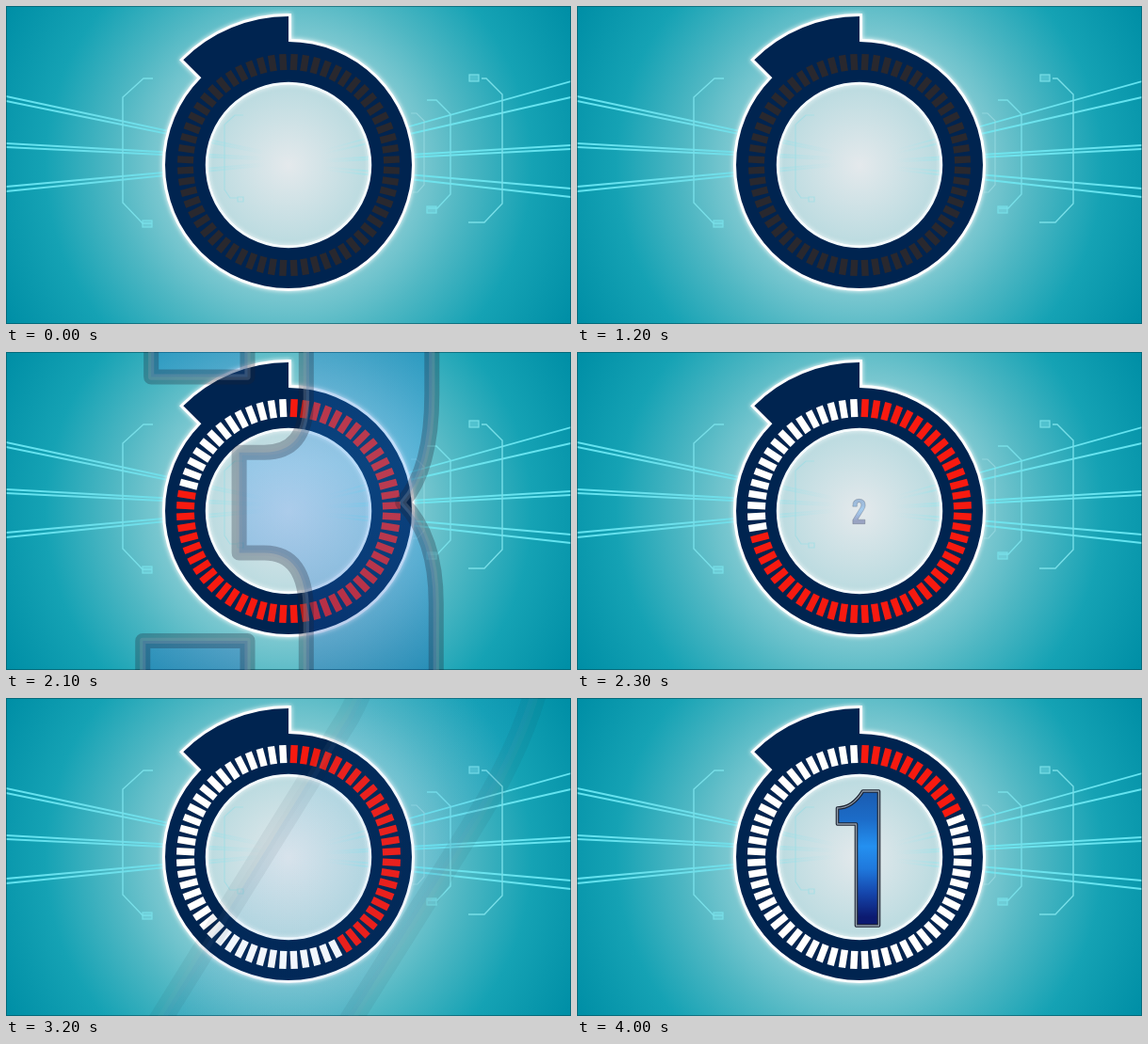
Write an HTML page with a canvas that moves like this. It is 600 px wide and 338 px high and loops after 4.1 s.

```html
<!DOCTYPE html>
<html lang="en">
<head>
<meta charset="utf-8">
<title>Countdown</title>
<style>
  html, body { margin: 0; width: 100%; height: 100%; overflow: hidden; background: #0096aa; }
  canvas { display: block; }
</style>
</head>
<body>
<canvas id="stage" width="600" height="338"></canvas>
<script>
const ctx = document.getElementById('stage').getContext('2d');
const W = 600, H = 338, CX = 300, CY = 169;
const LOOP = 4100, STEP = 100, TICKS = 60;
const NAVY = '#002450', TAU = Math.PI * 2;

// Digit outlines, relative to the dial centre
const digits = [
  'M-35-32V-46Q-35-72-1-72Q32-72 32-47V-28Q32-10 25-2Q33 6 33 22V46Q33 72-3 72Q-37 72-37 46V31H-12V47Q-12 54-5 54Q2 54 2 46V24Q2 10-8 10H-14V-14H-8Q2-14 2-26V-48Q2-58-5-58Q-12-58-12-48V-32Z',
  'M-43-29V-34Q-43-76-3-76Q37-76 37-36Q37-23 25-4L-12 55H35V82H-43V57L6-22Q11-31 11-42Q11-56-3-56Q-16-56-16-42V-29Z',
  'M20-70V73H-4V-35H-24V-52Q-8-52 3-70Z'
].map(d => new Path2D(d));

const brackets = new Path2D(
  'M156 77H146L124 97V209L145 231H155M505 77H510L527 94V210L508 230H491' +
  'M447 100H457L472 115V200L458 215H448');
const innerBrackets = new Path2D(
  'M430 114H436L444 122V190L437 198H432M252 116H243L232 126V195L238 204H246m0-1h6v5h-6z');
const beamEnds = { left: [96, 101, 146, 150, 192, 197], right: [80, 97, 148, 152, 194, 203] };

const clamp = x => Math.max(0, Math.min(1, x));

function gradient(g, stops) {
  stops.forEach(([at, color]) => g.addColorStop(at, color));
  return g;
}

const backdrop = gradient(ctx.createRadialGradient(CX, CY, 0, CX, CY, 340), [
  [0, '#e4e9ec'], [.25, '#bbdbe0'], [.38, '#82cad2'], [.55, '#4fb7c3'], [.76, '#15a2b4'], [1, '#008fa6']]);
const beamPaint = gradient(ctx.createLinearGradient(0, 0, W, 0), [
  [0, '#62e3f0'], [.28, '#72dde8'], [.38, '#a5dfe688'], [.46, '#c0e4ea00'],
  [.56, '#c0e4ea00'], [.7, '#72e3ec'], [1, '#62e3f0']]);
const digitPaint = gradient(ctx.createLinearGradient(0, -80, 0, 80), [
  [0, '#1a56a8'], [.25, '#1c6cc8'], [.43, '#2490f0'], [.58, '#1f78dc'], [.74, '#1546ac'], [.9, '#0c1a70']]);

function line(x1, y1, x2, y2) {
  ctx.beginPath();
  ctx.moveTo(x1, y1);
  ctx.lineTo(x2, y2);
  ctx.stroke();
}

function strokePath(path, color, width) {
  ctx.strokeStyle = color;
  ctx.lineWidth = width;
  ctx.stroke(path);
}

function drawBackground() {
  ctx.fillStyle = backdrop;
  ctx.fillRect(0, 0, W, H);

  ctx.strokeStyle = beamPaint;
  ctx.lineWidth = 1.8;
  beamEnds.left.forEach((y, i) => line(0, y, 290, 163 + (i - 2.5) * 2));
  beamEnds.right.forEach((y, i) => line(W, y, 310, 166 + (i - 2.5) * 2));

  strokePath(brackets, '#78dfe8', 1.4);
  strokePath(innerBrackets, '#9cdde5aa', 1.2);
  ctx.strokeStyle = '#78dfe8';
  ctx.fillStyle = '#78dfe866';
  for (const [x, y] of [[145, 228], [492, 73], [447, 213]]) {
    ctx.fillRect(x, y, 10, 7);
    ctx.strokeRect(x, y, 10, 7);
  }

  ctx.strokeStyle = '#06505e99';
  ctx.lineWidth = 1;
  ctx.strokeRect(.5, .5, W - 1, H - 1);
}

function drawDial(count, lit) {
  const top = -Math.PI / 2;
  const body = new Path2D();
  body.arc(CX, CY, 131, top, top + TAU * 7 / 8);
  body.arc(CX, CY, 158, top - TAU / 8, top);
  body.closePath();
  const hole = new Path2D();
  hole.arc(CX, CY, 87, 0, TAU);
  const shape = new Path2D(body);
  shape.addPath(hole);

  ctx.save();
  ctx.shadowColor = '#fff';
  ctx.shadowBlur = 5;
  strokePath(body, '#fff', 6);
  strokePath(hole, '#fff', 3);
  ctx.restore();
  ctx.fillStyle = NAVY;
  ctx.fill(shape, 'evenodd');
  strokePath(hole, '#f4fafc', 2.5);

  // Ticks are spent anticlockwise from the top
  for (let i = 0; i < TICKS; i++) {
    ctx.save();
    ctx.translate(CX, CY);
    ctx.rotate(-(i + .5) * TAU / TICKS);
    ctx.fillStyle = '#29282e';
    ctx.fillRect(-3.7, -118, 7.4, 17);
    ctx.globalAlpha = lit;
    ctx.fillStyle = i < count ? '#fff' : '#f71a10';
    ctx.fillRect(-3.7, -119, 7.4, 19);
    ctx.restore();
  }
}

// phase: grows in before 0, rests, then rushes at the viewer after .5
function drawDigit(path, phase) {
  const exit = Math.max(0, phase - .5);
  const grow = clamp(1 + phase / .18);
  const alpha = clamp(grow * 2) * clamp(1 - exit / .35) ** 2.2;
  if (!alpha) return;
  const scale = grow + 23 * exit;
  ctx.save();
  ctx.translate(CX + .5 * scale * scale, CY);
  ctx.scale(scale, scale);
  ctx.globalAlpha = alpha;
  ctx.lineJoin = 'round';
  ctx.fillStyle = digitPaint;
  ctx.fill(path);
  strokePath(path, '#1c2230', 3.6);
  strokePath(path, '#8f9cab', 1.4);
  ctx.restore();
}

function render(t) {
  const count = t < 3200 ? (t - 1450) / 50 : 35 + (t - 3200) * .0175;
  drawBackground();
  drawDial(Math.floor(count + .01), clamp((t - 1200) / 200));
  digits.forEach((path, i) => drawDigit(path, count / 20 - i));
}

function frame() {
  const t = performance.now() % LOOP;
  render(Math.floor(t / STEP) * STEP);
  requestAnimationFrame(frame);
}
frame();
</script>
</body>
</html>
```
